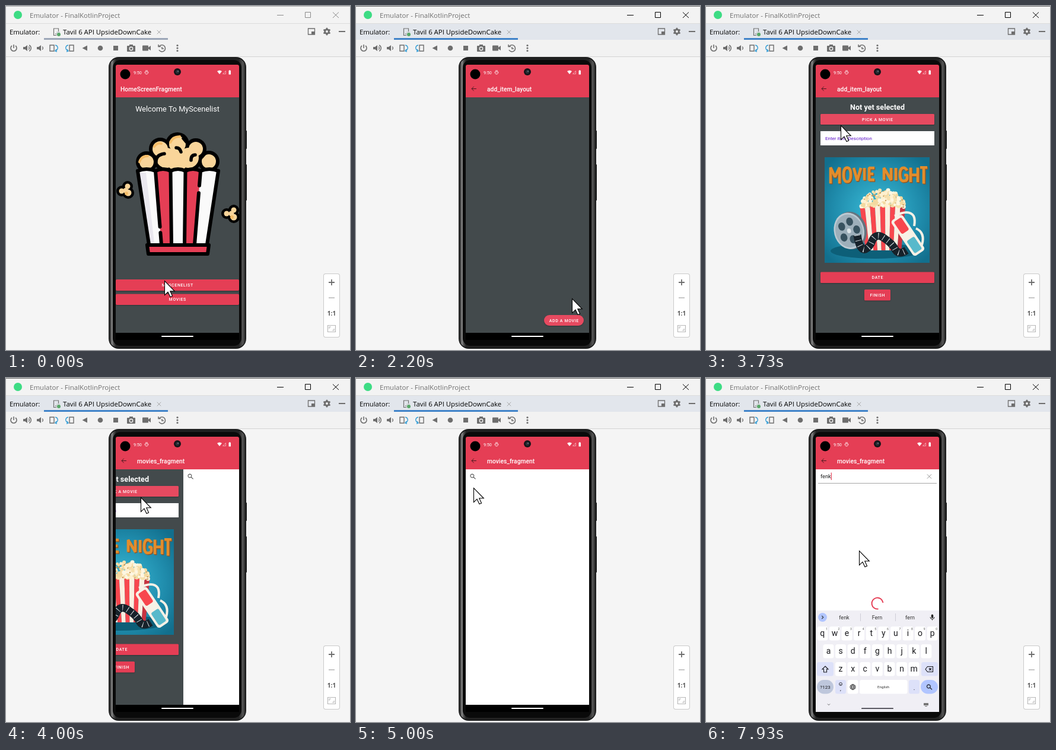
An HTML page with a canvas for the animation above (8 s loop, 580 px wide and 580 px high).

```html
<!DOCTYPE html>
<html lang="en">
<head>
<meta charset="utf-8">
<title>Emulator</title>
<style>
html, body { margin: 0; width: 100%; height: 100%; overflow: hidden; background: #f5f5f5; }
canvas { display: block; }
</style>
</head>
<body>
<canvas id="stage" width="580" height="580"></canvas>
<script>
const g = document.getElementById('stage').getContext('2d');
const LOOP = 8000;
const RED = '#e53e55', SLATE = '#434a4c', ICON = '#6e6e6e', CREAM = '#f9d59a';
const UI = '"Open Sans", sans-serif', APP = 'Roboto, sans-serif';
const HOME = 0, ITEMS = 1, ADD = 2, MOVIES = 3;
const titles = ['HomeScreenFragment', 'all_items_fragment', 'add_item_layout', 'movies_fragment'];
const titleTimes = [0, 540, 2060, 3740];
const slides = [[480, 1000], [2310, 2910], [3719, 4319]];
const QUERY = 'fenk';
const keyTimes = [7270, 7400, 7540, 7670];
const pointer = [
  [70, 267, 463], [130, 268, 468], [1270, 268, 468], [1650, 335, 515], [1870, 384, 534],
  [1960, 384, 543], [2060, 383, 531], [2130, 382, 529], [2450, 300, 365], [2730, 170, 163],
  [2930, 194, 173], [3200, 227, 213], [3330, 227, 210], [3470, 227, 201], [4330, 227, 201],
  [4520, 286, 222], [4800, 167, 180], [5000, 198, 185], [5130, 197, 166], [6270, 197, 166],
  [6700, 258, 291]
];

const clamp = v => Math.max(0, Math.min(1, v));
const ease = u => (1 - Math.cos(Math.PI * clamp(u))) / 2;

function rect(x, y, w, h, color, r = 0) {
  g.fillStyle = color;
  g.beginPath();
  g.roundRect(x, y, w, h, r);
  g.fill();
}
function disc(x, y, r, color) {
  g.fillStyle = color;
  g.beginPath();
  g.arc(x, y, r, 0, 7);
  g.fill();
}
function shape(d, x, y, fill, stroke, width = 1) {
  const p = new Path2D(d);
  g.save();
  g.translate(x, y);
  g.lineWidth = width;
  if (fill) { g.fillStyle = fill; g.fill(p); }
  if (stroke) { g.strokeStyle = stroke; g.stroke(p); }
  g.restore();
}
const line = (d, x, y, color, width) => shape(d, x, y, null, color, width);
function text(s, x, y, font, color, align = 'left', spacing = 0) {
  g.font = font;
  g.fillStyle = color;
  g.textAlign = align;
  g.letterSpacing = spacing + 'px';
  g.fillText(s, x, y);
}
function cross(x, y, r, color, width) {
  line(`M${-r} ${-r}L${r} ${r}M${r} ${-r}L${-r} ${r}`, x, y, color, width);
}
function magnifier(x, y, color, width) {
  line('M1.8 0A2.9 2.9 0 1 1-4 0A2.9 2.9 0 1 1 1.8 0M1 2L4.6 5.4', x, y, color, width);
}
function button(label, x, y, w, h, r, pressed) {
  g.save();
  g.shadowColor = 'rgba(0,0,0,.3)';
  g.shadowBlur = 2;
  g.shadowOffsetY = 1;
  rect(x, y, w, h, pressed ? '#e64a60' : RED, r);
  g.restore();
  text(label, x + w / 2 + .3, y + h / 2 + 2.6, '500 7px ' + APP, '#fff', 'center', .63);
}

function windowChrome(active) {
  rect(0, 0, 580, 580, '#f5f5f5');
  rect(0, 0, 580, 29, '#f3f3f3');
  rect(0, 0, 580, 1, active ? '#6b6b6b' : '#aaa');
  disc(20, 15, 7, '#3ddc84');
  text('Emulator - FinalKotlinProject', 40, 20, '11.5px ' + UI, '#707070');
  const c = active ? '#000' : '#8a8a8a';
  line('M457 15.5H468M504.5 10.5H513.5V19.5H504.5ZM551 10.5L561 20M561 10.5L551 20', 0, 0, c, 1);

  rect(0, 29, 580, 28, active ? '#e2e6ec' : '#f2f2f2');
  rect(0, 29, 580, 1, '#dcdcdc');
  rect(64, 54, 209, 3, active ? '#4083c9' : '#9ca7b8');
  text('Emulator:', 6, 48, '11.3px ' + UI, '#000');
  text('Tavil 6 API UpsideDownCake', 96, 48, '11.4px ' + UI, '#000');
  line('M80.5 38H88.5V49.5H80.5ZM83 47H86', 0, 0, ICON, 1.2);
  rect(85, 43, 6, 7, '#d5d8dc');
  disc(89, 48, 3, '#59a869');
  cross(258, 44, 3.3, '#a9a9a9', 1);
  line('M509.5 38H520.5V48H509.5Z', 0, 0, ICON, 1.3);
  rect(515, 43, 5, 5, ICON);
  disc(541, 43, 4.8, ICON);
  for (let i = 0; i < 6; i++) {
    const a = i * Math.PI / 3 + .52;
    disc(541 + 5 * Math.cos(a), 43 + 5 * Math.sin(a), 1.5, ICON);
  }
  disc(541, 43, 2, '#eee');
  rect(561, 42, 11, 2, ICON);

  rect(0, 57, 580, 28, '#f2f2f2');
  rect(0, 85, 580, 1, '#d3d3d3');
  toolbar();
  zoomPanel();
}

function toolbar() {
  const y = 71, blue = '#389fd6';
  line('M-3 -4A5 5 0 1 0 3 -4M0 -6V0', 13, y, ICON, 1.6);
  const speaker = 'M-6 -2H-3L1 -5V5L-3 2H-6Z';
  shape(speaker, 35, y, ICON);
  line('M3 -2.5A3 3 0 0 1 3 2.5M4 -5A5.5 5.5 0 0 1 4 5', 35, y, ICON, 1.4);
  shape(speaker, 58, y, ICON);
  line('M3 -2.5A3 3 0 0 1 3 2.5', 58, y, ICON, 1.4);
  line('M-7 -5H0V5H-7Z', 81, y, ICON, 1.4);
  line('M2 -5Q7 -4 6 1Q5 4 2 5M4 2L2 5L5 6', 81, y, blue, 1.4);
  line('M0 -5H7V5H0Z', 107, y, ICON, 1.4);
  line('M-2 -5Q-7 -4 -6 1Q-5 4 -2 5M-4 2L-2 5L-5 6', 107, y, blue, 1.4);
  shape('M-4.5 0L4 -4.5V4.5Z', 133, y, ICON);
  disc(159, y, 4.3, ICON);
  rect(181, 67, 8, 8, ICON);
  rect(204, 67, 14, 10, ICON, 1);
  rect(208, 65, 6, 3, ICON);
  disc(211, 72, 3.4, '#f2f2f2');
  disc(211, 72, 2, ICON);
  rect(230, 66.5, 10, 9, ICON, 1);
  shape('M3 -1L7 -4V4L3 1Z', 237, y, ICON);
  line('M-4.5 -3A5.6 5.6 0 1 1 -5 3M-6 -6V-2.5H-2M0 -2V1H3', 263, y, ICON, 1.6);
  for (const dy of [-4.5, 0, 4.5]) disc(289, y + dy, 1.6, ICON);
}

function zoomPanel() {
  rect(535, 451, 28, 108, '#c9c9c9', 4);
  rect(536, 452, 26, 106, '#fff', 3);
  line('M544 466H554M549 461V471', 0, 0, ICON, 1.8);
  line('M544 492H554', 0, 0, '#b5b5b5', 1.5);
  text('1:1', 549, 522, '700 10px ' + UI, '#555', 'center');
  line('M542.5 538.5H555.5V549.5H542.5ZM545 544V541H548M550 547H553V544', 0, 0, '#b9b9b9', 1.2);
}

function phone() {
  rect(403, 210, 3, 31, '#161616', 1);
  rect(403, 267, 3, 61, '#161616', 1);
  rect(173, 86, 232, 492, '#191a1a', 17);
  const side = g.createLinearGradient(174, 0, 404, 0);
  [[0, '#222'], [.012, '#444'], [.02, '#8a8a8a'], [.032, '#505050'], [.05, '#222'],
    [.95, '#222'], [.98, '#555'], [1, '#1c1c1c']].forEach(([p, c]) => side.addColorStop(p, c));
  rect(174, 88, 230, 488, side, 16);
  rect(180, 91, 217, 482, '#0a0a0a', 13);
  rect(185, 99, 208, 464, '#000');
}

function appBar(page) {
  rect(185, 99, 208, 55, RED, [3, 3, 0, 0]);
  disc(201, 115, 8.5, '#000');
  disc(289, 111, 6, '#14161a');
  disc(289, 111, 3, '#2b3038');
  disc(290, 110, 1, '#72808c');
  text('9:50', 215, 115, '7.2px ' + APP, '#fff');
  line('M-2.6 -1A2.8 2.8 0 1 0 2.6 -1ZM-2 -3H2', 237, 112, '#fff', .9);
  shape('M-4 -2Q0 -5 4 -2L0 3Z', 360, 112, '#fff');
  line('M-2.5 2.5H2.5V-2.5Z', 368, 112, '#f8b9c1', .8);
  rect(375.5, 109, 3.5, 6.5, '#fff', .5);
  rect(376.3, 108.2, 2, 1, '#fff');
  if (page !== HOME) line('M4 0H-4M-.3 -3.7L-4 0L-.3 3.7', 199, 139.5, '#4a1a20', 1);
  text(titles[page], page === HOME ? 193 : 221, 143.5, '500 10.3px ' + APP, '#fff');
}

function kernels(list, color, rim) {
  for (const [x, y, r] of list) disc(x, y, r, '#000');
  for (const [x, y, r] of list) disc(x, y, r - rim, color);
}

function popcornBucket() {
  kernels([[237, 263, 18], [260, 241, 19], [289, 233, 20], [320, 241, 18], [342, 262, 18],
    [270, 256, 23], [308, 256, 23], [289, 259, 25]], CREAM, 6);
  g.lineCap = g.lineJoin = 'round';
  line('M225 263Q228 253 239 253M250 237Q255 230 262 232M277 230Q282 220 293 220', 0, 0, '#f6bd68', 4);
  line('M253 264Q252 251 267 249M287 239Q293 239 295 246M312 260Q312 251 319 251M299 223L304 229M330 255L336 248', 0, 0, '#000', 5.5);
  const top = [222, 252, 277.5, 302.5, 328, 358], low = [241, 262, 279, 301, 318, 339];
  for (let i = 0; i < 5; i++) {
    const a = top[i], b = top[i + 1];
    shape(`M${a} 279Q${(a + b) / 2} 270 ${b} 279L${low[i + 1]} 402H${low[i]}Z`, 0, 0,
      i % 2 ? RED : '#fafafa', null);
    line(`M${a} 278Q${(a + b) / 2} 272 ${b} 278`, 0, 0, '#000', 6);
  }
  shape('M225 281H236L250 399H242Z', 0, 0, '#eae8ef');
  top.forEach((x, i) => {
    const gap = i === 1 ? [.76, .84] : i === 4 ? [.2, .3] : [1, 1];
    const at = u => `${x + (low[i] - x) * u} ${278 + 124 * u}`;
    line(`M${at(0)}L${at(gap[0])}M${at(gap[1])}L${at(1)}`, 0, 0, '#000', 6);
  });
  shape('M238 403H342L340 418H240Z', 0, 0, RED, '#000', 6);
  kernels([[195, 312, 9], [205, 304, 9], [206, 315, 10], [202, 311, 9]], CREAM, 4.5);
  kernels([[372, 350, 9], [384, 344, 9], [384, 356, 10], [380, 350, 9]], CREAM, 4.5);
  disc(203, 316, 3, '#f6bd68');
  disc(381, 356, 3, '#f6bd68');
  g.lineCap = 'butt';
  g.lineJoin = 'miter';
}

const glyphs = {
  M: 'M0 1V0L.5 .6L1 0V1', O: 'M.5 0Q1 0 1 .5Q1 1 .5 1Q0 1 0 .5Q0 0 .5 0Z', V: 'M0 0L.5 1L1 0',
  I: 'M.5 0V1', E: 'M1 0H0V1H1M0 .5H.8', N: 'M0 1V0L1 1V0',
  G: 'M1 .2Q.8 0 .5 0Q0 0 0 .5Q0 1 .5 1Q1 1 1 .8V.55H.6', H: 'M0 0V1M1 0V1M0 .5H1', T: 'M0 0H1M.5 0V1'
};
const banner = new Path2D();
[208, 230, 247, 262, 273, 0, 298, 315, 325, 343, 359].forEach((x, i) => {
  const ch = 'MOVIE NIGHT'[i];
  if (ch === ' ') return;
  const w = { M: 15, I: 6, E: 9 }[ch] || 12;
  const bend = ((x + w / 2 - 289) / 84) ** 2;
  banner.addPath(new Path2D(glyphs[ch]), new DOMMatrix([w, 0, 0, 20 + 9 * bend, x + 2, 273 - bend]));
});

function moviePoster() {
  g.save();
  g.beginPath();
  g.rect(200, 255, 177, 178);
  g.clip();
  const glow = g.createRadialGradient(289, 345, 15, 289, 345, 115);
  glow.addColorStop(0, '#35b3d0');
  glow.addColorStop(.6, '#1f8bab');
  glow.addColorStop(1, '#126f8d');
  rect(200, 255, 177, 178, glow);
  g.lineWidth = 4.6;
  g.lineJoin = 'bevel';
  g.save();
  g.translate(1.3, 1.3);
  g.strokeStyle = '#8f5426';
  g.stroke(banner);
  g.restore();
  g.strokeStyle = '#e28d2c';
  g.stroke(banner);

  g.fillStyle = '#0d5f78';
  g.beginPath();
  g.ellipse(286, 413, 76, 13, 0, 0, 7);
  g.fill();

  for (let i = 0; i < 9; i++) {
    const a = 259 + i * 8.6, b = 269 + i * 6.7;
    shape(`M${a} 336H${a + 8.6}L${b + 6.7} 412H${b}Z`, 0, 0,
      i % 2 ? '#fbefe0' : i > 6 ? '#c93440' : '#f8474e');
  }
  const tones = ['#fff0cf', '#f6e0ae', '#fdf6e2', '#f3d9a0', '#c99a5a'];
  let seed = 7;
  const rnd = () => (seed = seed * 16807 % 2147483647) / 2147483647;
  for (let i = 0; i < 220; i++) {
    const u = rnd() * 2 - 1, peak = 309 + 21 * u * u, tone = i % 5;
    disc(298 + 36 * u, peak + rnd() * (339 - peak), tone === 4 ? 1.2 : 2 + rnd() * 1.8, tones[tone]);
  }

  g.save();
  g.translate(242, 379);
  g.rotate(-.25);
  g.scale(.82, 1);
  disc(3, 0, 32, '#64747f');
  disc(-1, 0, 31, '#bccad3');
  disc(-1, 0, 28, '#9dafba');
  for (let i = 0; i < 5; i++) {
    const a = i * Math.PI * .4 - 1.2;
    disc(-1 + 16 * Math.cos(a), 16 * Math.sin(a), 7, '#38525f');
  }
  disc(-1, 0, 4, '#dce4e8');
  g.restore();

  const film = 'M255 386Q259 413 269 410Q277 406 281 394Q288 382 301 392Q314 400 320 412Q326 420 338 412';
  line(film, 0, 0, '#17222a', 13);
  g.setLineDash([1, 8]);
  line(film, 0, 0, '#d9e1e4', 10);
  g.setLineDash([]);

  line('M318 354Q342 342 350 354Q353 360 351 371M364 403Q370 382 354 375', 0, 0, '#f7f1e6', 4);
  g.save();
  g.translate(340, 387);
  g.rotate(.98);
  rect(-36, -12, 72, 23, '#f7f1e6', 5);
  rect(-32, -8, 25, 15, '#f8474e', 3);
  rect(7, -8, 25, 15, '#57b9cb', 3);
  g.restore();
  g.restore();
}

function drawPage(page, t) {
  rect(185, 154, 208, 397, page === MOVIES ? '#fff' : SLATE);
  if (page === HOME) {
    text('Welcome To MyScenelist', 289, 177.5, '12.7px ' + APP, '#fff', 'center');
    popcornBucket();
    button('MYSCENELIST', 185, 461, 208, 19, 2, t > 470);
    button('MOVIES', 185, 485.5, 208, 18.5, 2);
  } else if (page === ITEMS) {
    button('ADD A MOVIE', 317, 521, 67, 18, 9, t > 1960);
  } else if (page === ADD) {
    text('Not yet selected', 289, 175, '700 12.6px ' + APP, '#fff', 'center');
    button('PICK A MOVIE', 193, 182, 192, 18, 1.5, t > 3470);
    rect(193, 211, 192, 24, '#fff');
    text('Enter item Description', 201, 226, '8px ' + APP, '#5a10c8');
    moviePoster();
    button('DATE', 193, 448.5, 192, 18.5, 1.5);
    button('FINISH', 267, 478, 44, 18.5, 1.5);
  } else {
    searchField(t);
  }
}

function searchField(t) {
  if (t < 5270) return magnifier(197, 165, '#555', 1.1);
  const typed = QUERY.slice(0, keyTimes.filter(k => t >= k).length);
  text(typed, 193, 169, '9.2px ' + APP, '#222');
  const caretOn = t < 5600 || (t > 6100 && t < 6600) || typed;
  if (caretOn) rect(193 + g.measureText(typed).width, 159.5, 1.2, 12.5, RED);
  rect(189, 177, 200, 1, '#a6a6a6');
  cross(376.5, 166, 3.6, '#8a8a8a', .9);
  if (t >= 7400) {
    const k = (t - 7930) / 1000;
    g.strokeStyle = RED;
    g.lineWidth = 2;
    g.beginPath();
    g.arc(289, 380, 9.5, 1.4 + k * 5, 6.15 + k * 11);
    g.stroke();
  }
}

function keyRow(letters, x, y) {
  [...letters].forEach((ch, i) => {
    const cx = x + i * 20.6;
    rect(cx - 9, y, 18, 23.5, '#fff', 3.5);
    text(ch, cx, y + 16.3, '14px ' + APP, '#1b1b1f', 'center');
    if (letters.length === 10) text((i + 1) % 10, cx + 7, y + 6, '5px ' + APP, '#555', 'center');
  });
}

function keyboard(t) {
  const rise = t < 6040 ? 98 : 98 * (1 - ease((t - 6000) / 330));
  g.save();
  g.beginPath();
  g.rect(185, 154, 208, 409);
  g.clip();
  g.translate(0, rise);
  rect(185, 392, 208, 171, '#f0eff5');
  disc(196.5, 403.5, 7.5, '#b1c5ff');
  line('M-1.3 -2.6L1.3 0L-1.3 2.6', 196.5, 403.5, '#333', 1.1);
  if (t >= keyTimes[0]) {
    const n = keyTimes.filter(k => t >= k).length;
    const hints = [['f', 'for', 'from'], ['fe', 'feel', 'few'], ['fen', 'Fence', 'fend'], [QUERY, 'Fern', 'fern']][n - 1];
    hints.forEach((w, i) => text(w, 233 + i * 55.5, 407, '9px ' + APP, '#333', 'center'));
    rect(260, 397, 1, 13, '#cfced6');
    rect(319, 397, 1, 13, '#cfced6');
  } else {
    line('M-4 -4H4V1L1 4H-4ZM4 1H1V4', 225, 403.5, '#47464f', 1.1);
    text('GIF', 262, 406.5, '700 7px ' + APP, '#47464f', 'center');
    disc(299, 403.5, 4, '#47464f');
    disc(299, 403.5, 1.7, '#f0eff5');
    line('M-4 -3H4V4H-4ZM-2 0H2', 336, 403, '#47464f', 1.1);
  }
  rect(379.8, 398.5, 3.4, 6.5, '#222', 1.7);
  line('M-3.5 0A3.5 3.5 0 0 0 3.5 0M0 3.5V5.5', 381.5, 403, '#222', 1);

  keyRow('qwertyuiop', 196.3, 419);
  keyRow('asdfghjkl', 206.5, 449);
  keyRow('zxcvbnm', 227, 479);
  const pale = '#dde1f9';
  rect(187, 479, 28, 23.5, pale, 3.5);
  line('M0 -5L5 0H2.5V5H-2.5V0H-5Z', 201, 491, '#1b1b1f', 1.1);
  rect(363, 479, 28, 23.5, pale, 3.5);
  line('M-6.5 0L-3 -4.5H6V4.5H-3ZM-.5 -2L3.5 2M3.5 -2L-.5 2', 376.5, 491, '#1b1b1f', 1.1);
  rect(187, 509, 28, 23.5, '#bec7dc', 11.7);
  text('?123', 201, 523.5, '8px ' + APP, '#1b1b1f', 'center');
  rect(218, 509, 18, 23.5, pale, 3.5);
  line('M2.5 0A2.5 2.5 0 1 1-2.5 0A2.5 2.5 0 1 1 2.5 0M-1.2 .6Q0 2 1.2 .6', 227, 516, '#1b1b1f', .8);
  text(',', 227, 527, '9px ' + APP, '#1b1b1f', 'center');
  rect(238.5, 509, 18, 23.5, '#fff', 3.5);
  line('M4.5 0A4.5 4.5 0 1 1-4.5 0A4.5 4.5 0 1 1 4.5 0M-4 -1.5H4M-4 1.5H4M0 -4.5Q-4 0 0 4.5Q4 0 0 -4.5', 247.5, 521, '#1b1b1f', .9);
  rect(259, 509, 80.5, 23.5, '#fff', 3.5);
  text('English', 299, 523, '6.2px ' + APP, '#333', 'center');
  rect(342, 509, 18, 23.5, pale, 3.5);
  text('.', 351, 526, '10px ' + APP, '#1b1b1f', 'center');
  rect(362, 509, 29, 23.5, '#b1c5ff', 11.7);
  magnifier(376.5, 520, '#1b1b1f', 1.2);

  line('M-2 -1L0 1L2 -1', 207, 550.5, '#555', .9);
  rect(367, 548, 8, 4, '#777', .5);
  rect(369, 553, 4, 1, '#777');
  rect(262, 556.3, 54, 1.7, '#47464f', 1);
  g.restore();
}

function drawPointer(t) {
  let i = pointer.findIndex(p => p[0] > t);
  if (i < 0) i = pointer.length;
  const a = pointer[Math.max(0, i - 1)], b = pointer[Math.min(i, pointer.length - 1)];
  const u = a === b ? 0 : clamp((t - a[0]) / (b[0] - a[0]));
  const at = k => Math.round(a[k] + (b[k] - a[k]) * u);
  shape('M.5 .5V24.5L6 19.2L10 27.6L13.6 26L9.8 17.8H17.3Z', at(1), at(2), '#fff', '#000', 1.1);
}

function render(t) {
  windowChrome(t >= 470);
  phone();
  appBar(titleTimes.filter(s => t >= s).length - 1);
  const scroll = slides.reduce((sum, [from, to]) => sum + ease((t - from) / (to - from)), 0);
  const shift = Math.round(scroll * 208);
  g.save();
  g.beginPath();
  g.rect(185, 154, 208, 397);
  g.clip();
  for (let page = HOME; page <= MOVIES; page++) {
    const offset = page * 208 - shift;
    if (Math.abs(offset) >= 208) continue;
    g.save();
    g.translate(offset, 0);
    g.beginPath();
    g.rect(185, 154, 208, 397);
    g.clip();
    drawPage(page, t);
    g.restore();
  }
  g.restore();
  rect(262, 556, 54, 2, '#fff', 1);
  if (t >= 5930) keyboard(t);
  drawPointer(t);
}

function tick() {
  render(performance.now() % LOOP);
  requestAnimationFrame(tick);
}
tick();
</script>
</body>
</html>
```
